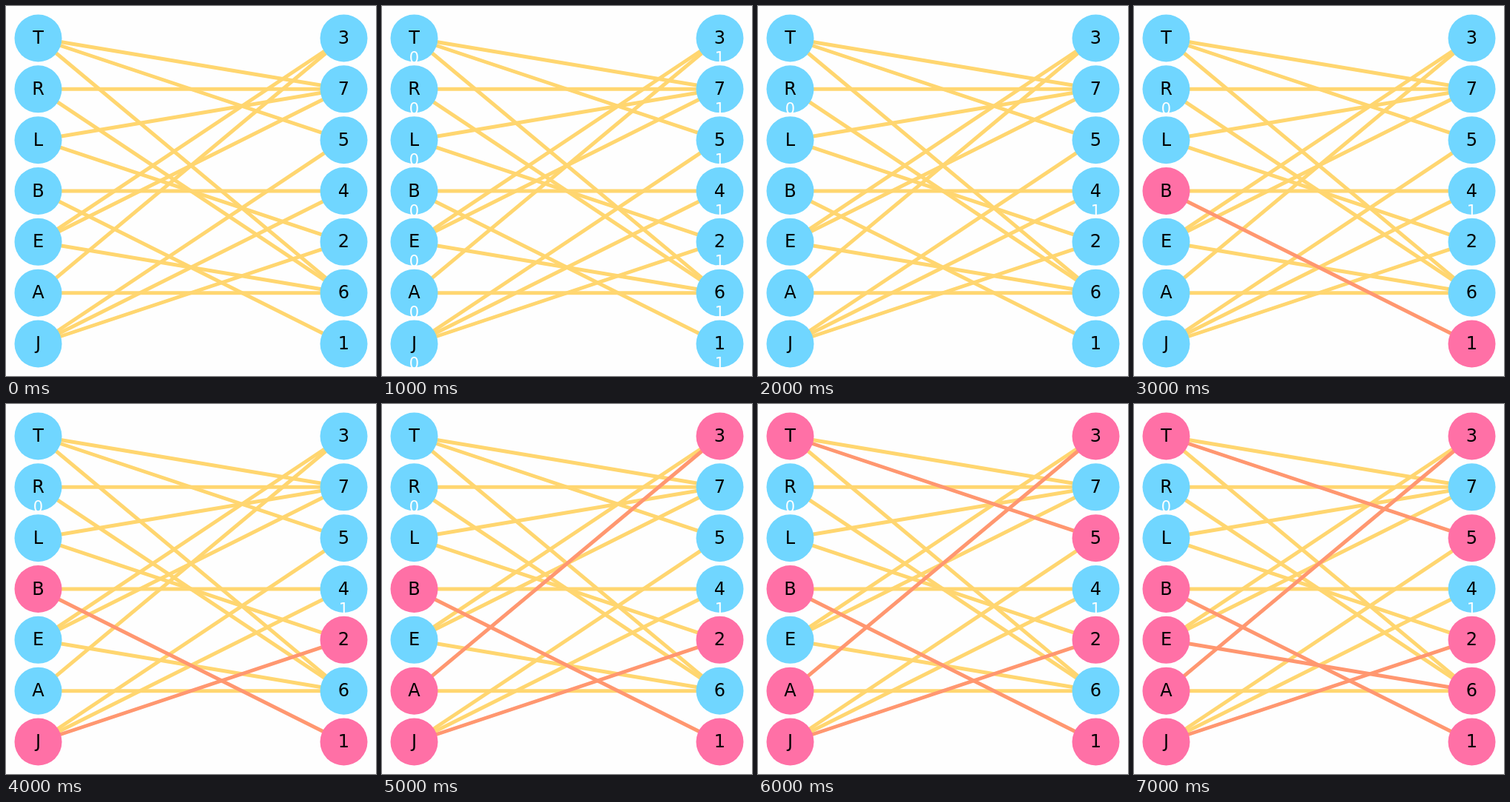
Recreate the animation shown at these times as an HTML page with a canvas. Size 500 px wide and 500 px high, loop 8 s.

```html
<!DOCTYPE html>
<html lang="en">
<head>
<meta charset="utf-8">
<title>Bipartite matching</title>
<style>
  html, body { margin: 0; width: 100%; height: 100%; overflow: hidden; background: #fefefe; }
  canvas { display: block; }
</style>
</head>
<body>
<canvas id="stage" width="500" height="500"></canvas>
<script>
const ctx = document.getElementById('stage').getContext('2d');
const LOOP = 8000, STEP = 1000;
const BACK = '#fefefe', BLUE = '#70d6ff', PINK = '#ff70a6', YELLOW = '#ffd670', ORANGE = '#ff9770';
const LEFT = 'TRLBEAJ', RIGHT = '3754261';
const EDGES = 'T7 T5 T6 R7 R6 L7 L2 B4 B1 E3 E7 E6 A3 A6 J5 J4 J2'.split(' ');
// One pair is matched per step, beginning at step 3.
const MATCHES = ['B1', 'J2', 'A3', 'T5', 'E6'];
const FIRST_MATCH = 3;
const UNMATCHED = 'R4';
const RADIUS = 32, MARGIN = 43.5, SPACING = 413 / 6;

const nodes = {};
const addSide = (names, x, layer) => [...names].forEach((name, i) => {
  nodes[name] = { name, x, y: MARGIN + i * SPACING, layer };
});
addSide(LEFT, MARGIN, '0');
addSide(RIGHT, 500 - MARGIN, '1');

function drawEdge([from, to], color) {
  const a = nodes[from], b = nodes[to];
  ctx.strokeStyle = color;
  ctx.beginPath();
  ctx.moveTo(a.x, a.y);
  ctx.lineTo(b.x, b.y);
  ctx.stroke();
}

function drawText(text, x, y, size, color) {
  ctx.font = `${size}px "DejaVu Sans", sans-serif`;
  ctx.fillStyle = color;
  ctx.fillText(text, x, y);
}

function drawNode({ name, x, y, layer }, matched, labelled) {
  ctx.fillStyle = matched ? PINK : BLUE;
  ctx.beginPath();
  ctx.arc(x, y, RADIUS, 0, 2 * Math.PI);
  ctx.fill();
  drawText(name, x, y + 7.5, 24, '#000');
  if (labelled) drawText(layer, x, y + 33.5, 21, '#fff');
}

function draw(time) {
  const step = Math.floor((time % LOOP) / STEP);
  const matching = MATCHES.slice(0, Math.max(0, step - FIRST_MATCH + 1));
  const matchedNames = matching.join('');

  ctx.fillStyle = BACK;
  ctx.fillRect(0, 0, 500, 500);
  ctx.lineWidth = 5;
  ctx.textAlign = 'center';
  EDGES.filter(edge => !matching.includes(edge)).forEach(edge => drawEdge(edge, YELLOW));
  matching.forEach(edge => drawEdge(edge, ORANGE));

  for (const node of Object.values(nodes)) {
    const labelled = step === 1 || (step > 1 && UNMATCHED.includes(node.name));
    drawNode(node, matchedNames.includes(node.name), labelled);
  }
}

const start = performance.now();
function tick() {
  draw(performance.now() - start);
  requestAnimationFrame(tick);
}
tick();
</script>
</body>
</html>
```
